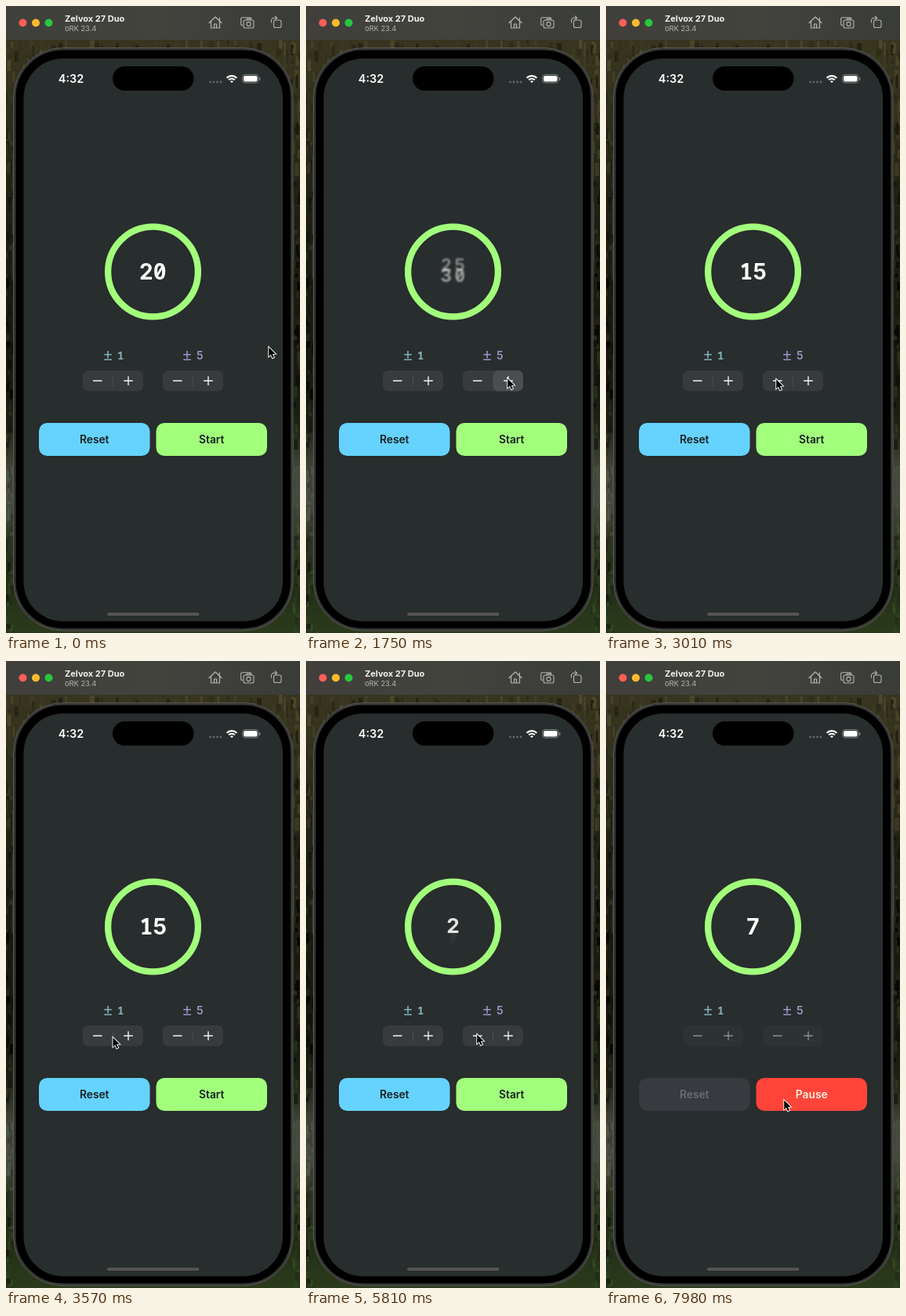
Write an HTML page with a canvas that moves like this. It is 375 by 800 pixels and loops after 8 s.

```html
<!DOCTYPE html>
<html lang="en">
<head>
<meta charset="utf-8">
<title>Countdown timer</title>
<style>
  html, body { margin: 0; width: 100%; height: 100%; overflow: hidden; background: #24291f; }
  canvas { display: block; width: 375px; height: 800px; }
</style>
</head>
<body>
<canvas id="stage"></canvas>
<script>
const W = 375, H = 800, LOOP = 8000, STEP = 70;
const ROLL = 380, PRESS = 150, START_AT = 7740;
const SANS = 'Inter, sans-serif', MONO = '"Noto Sans Mono", monospace';
const GREEN = '#a2ff7c', SCREEN = '#282d2d';
const canvas = document.getElementById('stage');
const dpr = window.devicePixelRatio || 1;
canvas.width = W * dpr;
canvas.height = H * dpr;
const ctx = canvas.getContext('2d');

const clamp = v => Math.max(0, Math.min(1, v));
const lerp = (a, b, p) => a + (b - a) * p;
const smooth = p => p * p * (3 - 2 * p);
const easeOut = p => 1 - (1 - p) ** 3;
const bump = (v, mid, width) => Math.exp(-(((v - mid) / width) ** 2));
const rand = n => Math.abs(Math.sin(n * 12.9898) * 43758.5453) % 1;

// The pointer rests at (x, y) and taps evenly while it stays.
const stay = (arrive, leave, x, y, step = 0, taps = 0) => ({ arrive, leave, x, y, step, taps });
const visits = [
  stay(0, 200, 335, 434),
  stay(980, 980, 231, 472),
  stay(1190, 1820, 257, 474, 5, 2),
  stay(2150, 2410, 217, 475, -10, 1), // a double tap, rolled as one
  stay(2410, 3050, 217, 475, -5, 1),
  stay(3780, 4410, 116, 480, -1, 3),
  stay(4880, 5870, 218, 475, -5, 2),
  stay(6230, 6720, 257, 474, 5, 1),
  stay(7420, LOOP, 227, 559)
];
const taps = visits.flatMap(v => Array.from({ length: v.taps }, (_, i) => ({
  time: lerp(v.arrive, v.leave, (i + .5) / v.taps),
  step: v.step,
  stepper: v.x > 187 ? 1 : 0
})));

function box(x, y, w, h, r, fill, stroke, lw = 1) {
  ctx.beginPath();
  ctx.roundRect(x, y, w, h, r);
  if (fill) { ctx.fillStyle = fill; ctx.fill(); }
  if (stroke) { ctx.strokeStyle = stroke; ctx.lineWidth = lw; ctx.stroke(); }
}

function disc(x, y, r, fill) {
  ctx.beginPath();
  ctx.arc(x, y, r, 0, 7);
  ctx.fillStyle = fill;
  ctx.fill();
}

function line(d, color, lw) {
  ctx.strokeStyle = color;
  ctx.lineWidth = lw;
  ctx.stroke(new Path2D(d));
}

function label(text, x, y, font, color, align = 'left') {
  ctx.font = font;
  ctx.fillStyle = color;
  ctx.textAlign = align;
  ctx.fillText(text, x, y);
}

// Slashed zero and footed one come from the mono face.
const face = ch => '01'.includes(ch) ? MONO : SANS;

function forestColor(y, light = 0) {
  const mist = bump(y, 615, 65), ground = clamp((y - 640) / 160);
  const s = 28 - 20 * mist + 8 * ground;
  const l = 8 + 9 * bump(y, 20, 190) + 19 * mist + 9 * ground + light;
  return `hsl(${52 + y * .05} ${s}% ${l}%)`;
}

function forest() {
  for (let y = 0; y < H; y += 4) {
    ctx.fillStyle = forestColor(y);
    ctx.fillRect(0, y, W, 4);
  }
  for (let i = 0; i < 420; i++) {
    const top = i < 120;
    const x = top ? rand(i) * W : rand(i) * 12 + (i % 2 ? 361 : -3);
    const y = top ? 42 + rand(i + .3) * 34 : 50 + rand(i + .3) * 750;
    ctx.fillStyle = forestColor(y, (rand(i + .6) - .5) * 13);
    ctx.fillRect(x, y, 2 + rand(i + .8) * 4, 4 + rand(i + .1) * 14);
  }
}

function titleBar() {
  const g = ctx.createLinearGradient(0, 0, W, 0);
  g.addColorStop(0, '#403f3b');
  g.addColorStop(.5, '#42433d');
  g.addColorStop(1, '#3a3c39');
  ctx.fillStyle = g;
  ctx.fillRect(0, 0, W, 43);
  ['#ff5f57', '#febc2e', '#28c840'].forEach((c, i) => disc(21.5 + i * 16.5, 21.5, 5, c));
  label('Zelvox 27 Duo', 75, 20, `700 11px ${SANS}`, '#f1f1ef');
  label('oRK 23.4', 75, 32, `400 9.3px ${SANS}`, '#b2b2af');

  const c = '#b4b4b0';
  ctx.lineJoin = ctx.lineCap = 'round';
  line('M259 21.5l8-7.5 8 7.5M261.5 20v8h11v-8M265.5 28v-5h3v5M272.3 15v3', c, 1.2);
  line('M301.5 24.5h-1l-.8-.8v-8l1-.9h11l1.3 1.2M306.5 18l1-1.6h4l1 1.6', c, 1.1);
  box(303, 18, 13, 10, 2, null, c, 1.1);
  ctx.beginPath();
  ctx.arc(309.5, 23, 2.6, 0, 7);
  ctx.stroke();
  box(341.5, 18, 9.5, 9.5, 2, null, c, 1.1);
  line('M338.5 21v-3.5l2-2.2h5M343.3 13l2.4 2.3-2.4 2.3', c, 1.1);
}

function phone() {
  for (let i = 0; i < 3; i++) box(7.5, 190 + i * 56, 3, 46, 1, '#30322e');
  box(365, 250, 3, 76, 1, '#30322e');
  box(9.5, 53.5, 356.5, 743.5, 63, '#242523', '#5d5e5a');
  box(11.5, 55.5, 352.5, 739.5, 61, '#000', '#3c3d3b', 1.6);
  box(22.5, 67, 330.5, 718, 50, SCREEN);
  box(136, 77, 103.5, 31, 15.5, '#000');
  label('4:32', 83, 98, `600 14.4px ${SANS}`, '#fff', 'center');

  for (let i = 0; i < 4; i++) disc(260.5 + i * 4.5, 97, 1.4, '#63676a');
  ctx.lineCap = 'butt';
  ctx.strokeStyle = '#fff';
  ctx.lineWidth = 2.1;
  for (const r of [1.7, 5.4, 9]) {
    ctx.beginPath();
    ctx.arc(288, 98.1, r, -Math.PI * .755, -Math.PI * .245);
    ctx.stroke();
  }
  box(301.5, 87.5, 20.5, 10.5, 3.4, null, '#7d8181');
  box(303, 89, 17.5, 7.5, 2.2, '#fff');
  box(323, 91, 1.4, 4, .7, '#7d8181');
  box(129, 774, 117.5, 4, 2, '#565453');
}

function ring() {
  ctx.beginPath();
  ctx.arc(187.5, 339, 57.4, 0, 7);
  ctx.strokeStyle = GREEN;
  ctx.lineWidth = 8.3;
  ctx.stroke();
}

function digit(ch, x, shift, presence) {
  if (ch === ' ' || presence <= .01) return;
  ctx.save();
  ctx.translate(x, 339 + shift);
  const s = lerp(.55, 1, presence);
  ctx.scale(s, s);
  ctx.globalAlpha = presence;
  if (presence < .97) ctx.filter = `blur(${(1 - presence) * 2.2 * dpr}px)`;
  label(ch, 0, 10.2, `700 28px ${face(ch)}`, '#fff', 'center');
  ctx.restore();
}

function counter(t) {
  let from = 20, to = 20, at = -ROLL;
  for (const tap of taps.filter(tap => tap.time <= t)) {
    from = to;
    to += tap.step;
    at = tap.time;
  }
  const p = easeOut(clamp((t - at) / ROLL));
  const dir = Math.sign(from - to);
  const a = String(from).padStart(2), b = String(to).padStart(2);
  const half = 8.7 * lerp(from > 9, to > 9, p);
  [187.5 - (half || 8.7), 187.5 + half].forEach((x, i) => {
    if (a[i] === b[i]) return digit(b[i], x, 0, 1);
    digit(a[i], x, dir * 16 * p, 1 - p);
    digit(b[i], x, -dir * 11 * (1 - p), p);
  });
}

function stepLabel(x, n, color) {
  line(`M${x - 4.8} 444.8h9.6M${x} 440v9.4M${x - 4.8} 451.3h9.6`, color, 1.6);
  label(n, x + 16.3, 451.2, `600 14px ${face(n)}`, color, 'center');
}

function stepper(x, color, fill, divider, tap) {
  box(x, 465, 77, 26.5, 7, fill);
  if (tap) box(x + (tap.step > 0 ? 38.5 : 0), 465, 38.5, 26.5, 7, '#4b4e50');
  else line(`M${x + 38.5} 472v13`, divider, 1);
  line(`M${x + 13} 478.3h11.5M${x + 52.2} 478.3h11.6M${x + 58} 472.5v11.6`, color, 1.4);
}

function button(x, text, fill, color) {
  box(x, 532, 141.5, 42, 10.5, fill);
  label(text, x + 70.7, 558, `600 13.8px ${SANS}`, color, 'center');
}

function controls(t) {
  stepLabel(130, '1', '#83b2b7');
  stepLabel(231, '5', '#a096c8');
  const run = clamp((t - START_AT) / 200);
  if (run < 1) {
    const tap = taps.find(({ time }) => t >= time && t < time + PRESS);
    [98, 200].forEach((x, i) =>
      stepper(x, '#f2f3f3', '#383b3d', '#4b4e50', tap?.stepper === i && tap));
    button(42, 'Reset', '#66d3ff', '#17201f');
    button(191.5, 'Start', GREEN, '#17201f');
  }
  ctx.globalAlpha = run;
  for (const x of [98, 200]) stepper(x, '#898d8e', '#2d3335', '#2d3335');
  button(42, 'Reset', '#373b3f', '#686c70');
  button(191.5, 'Pause', '#ff453a', '#fff1df');
  ctx.globalAlpha = 1;
}

const arrow = new Path2D('M.2 1.4v11.8l2.7-2.5 2 4.5 2-.9-2-4.4 3.7-.2z');

function cursor(t) {
  const next = visits.find(v => v.arrive > t) || visits.at(-1);
  const last = visits.findLast(v => v.arrive <= t);
  const p = next === last ? 0 : smooth(clamp((t - last.leave) / (next.arrive - last.leave)));
  ctx.save();
  ctx.translate(lerp(last.x, next.x, p), lerp(last.y, next.y, p));
  ctx.lineJoin = 'miter';
  ctx.strokeStyle = '#fff';
  ctx.lineWidth = 1.8;
  ctx.stroke(arrow);
  ctx.fillStyle = '#000';
  ctx.fill(arrow);
  ctx.restore();
}

function tick() {
  const t = Math.floor((performance.now() - begin) % LOOP / STEP) * STEP;
  ctx.setTransform(dpr, 0, 0, dpr, 0, 0);
  forest();
  titleBar();
  phone();
  ring();
  counter(t);
  controls(t);
  cursor(t);
  requestAnimationFrame(tick);
}

const begin = performance.now();
tick();
</script>
</body>
</html>
```
